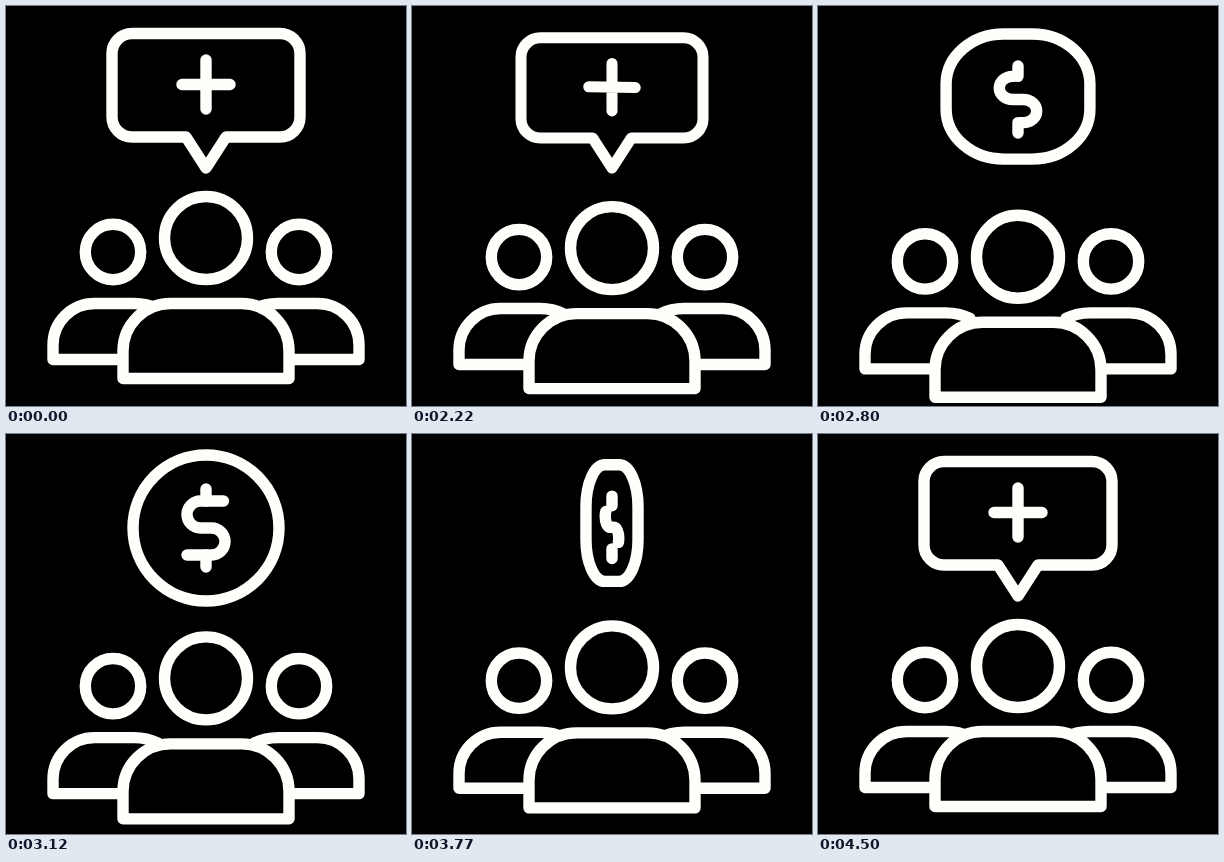
Recreate the animation shown at these times as an HTML page with a canvas. Size 400 by 400 pixels, loop 4520 ms.

```html
<!DOCTYPE html>
<html lang="en">
<head>
<meta charset="utf-8">
<style>
  html, body { margin: 0; height: 100%; overflow: hidden; background: #000; }
  canvas { display: block; }
</style>
</head>
<body>
<canvas id="stage" width="400" height="400"></canvas>
<script>
const LOOP = 4520, LINE = 11.4;
const ctx = document.getElementById('stage').getContext('2d');
const smooth = x => x * x * (3 - 2 * x);

// Value at time t of a list of [time, value] keys, eased between keys.
function track(t, keys) {
  const next = keys.findIndex(key => key[0] > t);
  if (next === 0) return keys[0][1];
  if (next < 0) return keys[keys.length - 1][1];
  const [t0, a] = keys[next - 1], [t1, b] = keys[next];
  return a + (b - a) * smooth((t - t0) / (t1 - t0));
}

// Scales a shape about a pivot while its line width stays constant.
function strokeScaled(px, py, sx, sy, build) {
  ctx.save();
  ctx.translate(px, py);
  ctx.scale(sx, sy);
  ctx.translate(-px, -py);
  ctx.beginPath();
  build();
  ctx.restore();
  ctx.stroke();
}

function line(x1, y1, x2, y2) {
  ctx.moveTo(x1, y1);
  ctx.lineTo(x2, y2);
}

function drawHead(x, y, r) {
  ctx.beginPath();
  ctx.arc(x, y, r, 0, Math.PI * 2);
  ctx.stroke();
}

const sideBody = new Path2D('M115 353.5H47V339A41.5 41.5 0 0 1 88.5 297.5H128Q141 297.5 152 303');
const mainBody = new Path2D('M117 372.5V345A47.5 47.5 0 0 1 164.5 297.5H235.5A47.5 47.5 0 0 1 283 345V372.5Z');

function drawPeople(drop) {
  for (const side of [1, -1]) {
    ctx.save();
    ctx.translate(200, drop / 2);
    ctx.scale(side, 1);
    ctx.translate(-200, 0);
    drawHead(107, 246, 27.7);
    ctx.stroke(sideBody);
    ctx.restore();
  }
  ctx.save();
  ctx.translate(0, drop);
  drawHead(200, 232, 41.5);
  ctx.fill(mainBody);
  ctx.stroke(mainBody);
  ctx.restore();
}

function drawBubble(scale, width) {
  ctx.lineWidth = LINE * scale;
  strokeScaled(200, 163, scale * width, scale, () => {
    ctx.moveTo(200, 162);
    ctx.lineTo(180, 131);
    ctx.arcTo(106, 131, 106, 111, 20);
    ctx.arcTo(106, 27.5, 126, 27.5, 20);
    ctx.arcTo(294, 27.5, 294, 47, 20);
    ctx.arcTo(294, 131, 274, 131, 20);
    ctx.lineTo(220, 131);
    ctx.closePath();
  });
  const tilt = 12 * (1 - scale);
  strokeScaled(200, 163, scale * width, scale, () => {
    line(176, 78.5 - tilt, 224, 78.5 + tilt);
    line(200, 54, 200, 103);
  });
}

function drawCoin(width, growth) {
  const h = 52 + 21 * growth, w = 73 * width;
  const cy = 87 + 7 * growth, round = 0.6 + 0.4 * growth;
  ctx.beginPath();
  ctx.roundRect(200 - w, cy - h, 2 * w, 2 * h, { x: w * round, y: h * round });
  ctx.stroke();

  const r = 13.5, quarter = Math.PI / 2;
  const centre = 93 + growth, sy = h / 73;
  strokeScaled(200, centre, width, sy, () => {
    for (const side of [-1, 1]) line(200, centre + side * 27, 200, centre + side * 39);
  });

  const length = 59 * width + Math.PI * r * (width + sy), shown = 0.35 + 0.65 * growth;
  if (shown < 1) {
    ctx.setLineDash([length * shown, length * 2]);
    ctx.lineDashOffset = -length * (1 - shown) / 2;
  }
  strokeScaled(200, centre, width, sy, () => {
    ctx.moveTo(217.5, centre - 2 * r);
    ctx.arc(194.5, centre - r, r, -quarter, quarter, true);
    ctx.arc(205.5, centre + r, r, -quarter, quarter);
    ctx.lineTo(181, centre + 2 * r);
  });
  ctx.setLineDash([]);
}

function draw(t) {
  ctx.fillStyle = '#000';
  ctx.fillRect(0, 0, 400, 400);
  ctx.strokeStyle = '#fdfffa';
  ctx.lineWidth = LINE;
  ctx.lineCap = ctx.lineJoin = 'round';

  const rise = Math.min(1, Math.max(0, (t - 2640) / 1660));
  const drop = t < 2640
    ? track(t, [[2020, 0], [2420, 20]])
    : 20 * (1 - smooth(1 - (1 - rise) ** 1.6));
  drawPeople(drop);

  if (t >= 2610 && t < 3880) {
    drawCoin(
      track(t, [[2610, 0.03], [2800, 0.985], [3000, 1], [3600, 1], [3880, 0.03]]),
      track(t, [[2600, 0], [3000, 1], [3580, 1], [3880, 0]]));
  } else {
    drawBubble(
      track(t, [[2015, 1], [2015, 0.978], [2130, 0.94], [2430, 1.068], [2500, 1.068], [2610, 1]]),
      track(t, [[2460, 1], [2610, 0.03], [3880, 0.03], [4320, 1]]));
  }
}

function frame() {
  draw(performance.now() % LOOP);
  requestAnimationFrame(frame);
}
frame();
</script>
</body>
</html>
```
